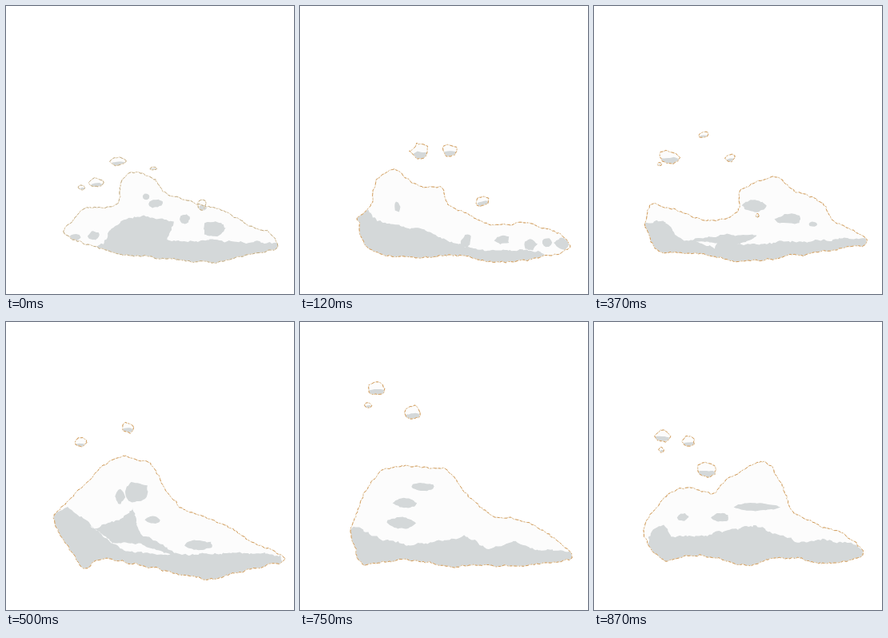
An HTML page for the animation above (1000 ms loop, 360 by 360 pixels).

```html
<!DOCTYPE html>
<html lang="en">
<head>
<meta charset="utf-8">
<title>Drifting smoke</title>
<style>
  html, body { margin: 0; width: 100%; height: 100%; overflow: hidden; background: #fff; }
  svg { display: block; width: 100vw; height: 100vh; }
  .line { fill: none; stroke-linejoin: round; }
</style>
</head>
<body>
<svg viewBox="0 0 360 360">
  <clipPath id="clip"><path id="mask"/></clipPath>
  <path id="body" fill="#fcfcfc"/>
  <g clip-path="url(#clip)">
    <path id="shade" fill="#d4d8d9"/>
    <path id="gap" fill="#fcfcfc"/>
  </g>
  <path id="soft" class="line" stroke="#eedfc8"/>
  <path id="dark" class="line" stroke-width=".9" stroke-dasharray="3 2 1 3 4 2"/>
</svg>
<script>
const LOOP = 1000;
const parse = text => text ? text.split(' ').map(p => p.split(',').map(Number)) : [];

// body and band are x,y points; puffs and spots are x,y,rx,ry ovals.
const pose = (at, body, band, puffs, spots, gap = '') =>
  ({ at, body: parse(body), band: parse(band), puffs: parse(puffs), spots: parse(spots), gap: parse(gap) });

const rise = pose(0,
  '73,283 86,266 102,253 137,249 142,222 156,208 184,215 201,234 236,246 272,257 303,273 330,283 339,303 298,312 262,321 202,315 140,309 97,297',
  '122,298 130,281 148,269 172,262 210,271 202,293 280,293 342,297',
  '140,194,10,5 113,221,9,6 95,227,4,3 184,203,4,2 245,248,5,7',
  '260,278,14,10 223,266,6,6 175,238,4,4 187,247,10,5 110,287,7,6 86,289,7,4');
const lean = pose(120,
  '72,268 90,250 90,230 100,212 120,206 148,224 176,225 186,247 214,263 250,275 284,271 326,286 337,303 298,315 252,320 200,312 145,314 90,306',
  '68,262 82,253 96,268 120,276 146,278 175,291 216,304 300,306',
  '149,182,11,9 186,181,9,7 229,244,8,7',
  '288,298,8,7 309,296,6,5 253,292,9,6 122,251,4,6 328,297,9,7 207,293,6,8');
const dip = pose(370,
  '65,274 72,249 100,254 130,266 166,266 183,250 185,230 224,213 248,230 284,246 302,269 336,287 336,299 298,305 250,312 192,319 120,309 80,307',
  '60,272 86,268 110,291 168,285 204,285 178,298 250,294 338,289',
  '95,189,12,8 137,161,6,4 170,190,6,5 82,198,3,2 204,262,2,2',
  '200,249,14,8 243,267,16,7 274,273,5,3',
  '126,295 154,298 150,304');
const peak = pose(500,
  '62,252 71,231 102,201 122,178 146,169 178,175 193,196 212,228 248,245 280,257 304,273 344,290 342,300 296,310 252,321 190,309 124,297 96,305',
  '60,240 78,233 114,257 144,248 158,230 168,264 214,290 345,290',
  '93,151,8,6 152,132,8,6',
  '163,212,16,12 142,218,6,10 184,247,9,4 242,279,18,6',
  '106,255 132,275 170,278 206,290 150,287');
const tower = pose(620,
  '65,262 70,240 68,205 82,165 110,148 150,170 156,195 180,226 230,245 256,238 292,252 326,276 342,296 290,305 248,314 186,308 124,301 72,307',
  '60,250 73,253 76,271 106,277 145,291 210,282 225,291 250,279 280,295 343,291',
  '105,99,11,8 86,122,5,4 162,152,11,10',
  '144,258,32,8 106,207,18,9 102,181,4,4 208,270,9,2 119,190,2,3');
const spread = pose(870,
  '63,263 74,236 97,214 122,208 148,214 172,193 212,175 232,200 250,238 286,255 316,268 333,281 333,294 284,301 245,293 188,303 136,292 86,297',
  '70,267 78,257 90,254 98,268 140,267 200,254 250,274 285,272 318,275 336,283',
  '85,142,10,7 84,160,3,3 118,149,8,6 141,185,13,10',
  '111,244,7,5 157,245,11,5 205,231,27,5');

// Halfway pose; the loose puffs may sit higher.
function between(at, a, b, lift) {
  const mid = key => a[key].slice(0, b[key].length)
    .map((p, i) => p.map((v, j) => (v + b[key][i][j]) / 2));
  return { at, body: mid('body'), band: mid('band'), spots: mid('spots'), gap: [],
    puffs: mid('puffs').map(([x, y, ...r]) => [x, y - lift, ...r]) };
}

const poses = [rise, lean, between(250, lean, dip, 0), dip, peak, tower,
  between(750, tower, spread, 37), spread];

function random(seed) {
  return () => {
    seed = (seed * 16807) % 2147483647;
    return seed / 2147483647;
  };
}

const line = (a, b, c, d, t) => b + (c - b) * t;
const spline = (a, b, c, d, t) =>
  b + t / 2 * (c - a + t * (2 * a - 5 * b + 4 * c - d + t * (3 * (b - c) + d - a)));

// Closed ragged edge: fine jitter on top of slower lumps.
function ragged(pts, rnd, rough, curve = line) {
  const n = pts.length, out = [], lump = [0, 0];
  pts.forEach((b, i) => {
    const a = pts[(i + n - 1) % n], c = pts[(i + 1) % n], d = pts[(i + 2) % n];
    const steps = Math.max(1, Math.round(Math.hypot(c[0] - b[0], c[1] - b[1]) / 2.4));
    for (let k = 0; k < steps; k++) {
      out.push([0, 1].map(j => {
        lump[j] = lump[j] * .8 + (rnd() - .5) * rough;
        return (curve(a[j], b[j], c[j], d[j], k / steps) + lump[j] + (rnd() - .5) * rough * .5).toFixed(1);
      }));
    }
  });
  return n ? 'M' + out.join('L') + 'Z' : '';
}

function oval([x, y, rx, ry], rnd) {
  const pts = Array.from({ length: 10 }, (_, i) => {
    const a = i * Math.PI / 5, r = .85 + rnd() * .3;
    return [x + Math.cos(a) * rx * r, y + Math.sin(a) * ry * r];
  });
  return ragged(pts, rnd, Math.min(1.5, ry * .2));
}

const ovals = (list, rnd) => list.map(o => oval(o, rnd)).join('');

const built = poses.map((p, i) => {
  const rnd = random(911 + i * 77);
  const under = p.puffs.map(([x, y, rx, ry]) => [x + 1, y + ry * .55, rx, ry * .5]);
  const floor = [[348, 330], [55, 330]];
  return {
    edge: ragged(p.body, rnd, 2, spline) + ovals(p.puffs, rnd),
    shade: ragged([...p.band, ...floor], rnd, 2.4) + ovals([...p.spots, ...under], rnd),
    gap: ragged(p.gap, rnd, 1.8)
  };
});

const el = id => document.getElementById(id);
let shown = -1;

function draw(time) {
  const i = poses.filter(p => p.at <= time % LOOP).length - 1;
  if (i === shown) return;
  shown = i;
  const { edge, shade, gap } = built[i];
  for (const id of ['mask', 'body', 'soft', 'dark']) el(id).setAttribute('d', edge);
  el('shade').setAttribute('d', shade);
  el('gap').setAttribute('d', gap);
  el('dark').setAttribute('stroke', i ? '#cf9550' : '#bda67c');
}

function tick() {
  draw(performance.now());
  requestAnimationFrame(tick);
}
tick();
</script>
</body>
</html>
```
